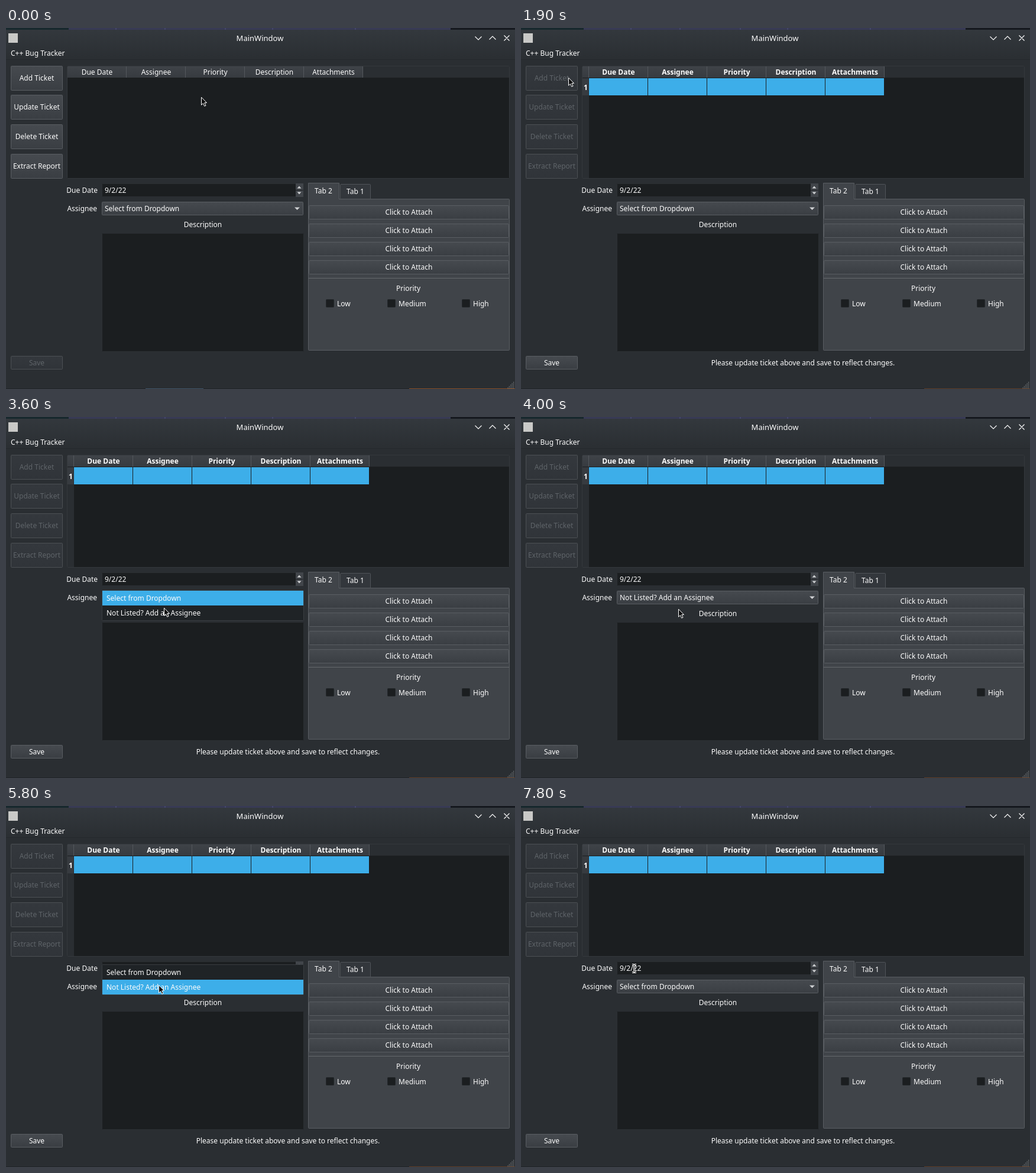
Recreate the animation shown at these times as an HTML page. Size 861x611 px, loop 8 s.

```html
<!DOCTYPE html>
<html lang="en">
<head>
<meta charset="utf-8">
<title>Bug tracker</title>
<style>
html, body { margin: 0; width: 100%; height: 100%; overflow: hidden; background: #2a2e32; }
svg { display: block; width: 861px; height: 611px; }
text { font: 12px "Noto Sans", sans-serif; fill: #fcfcfc; }
.title { font-size: 13px; }
.mid { text-anchor: middle; }
.end { text-anchor: end; }
.bold { font-weight: 700; }
.off { fill: #5f6469; }
.line { fill: none; stroke: #fcfcfc; stroke-width: 1.2; }

.anim, .anim * { animation: 8s step-end infinite; }
.anim.before { animation-name: before; }
.anim.after { animation-name: after; }
.anim.press { animation-name: press; }
.anim.glow { animation-name: glow; }
.anim.first { animation-name: first; }
.anim.second { animation-name: second; }
.anim.popup { animation-name: popup; }
.anim.popup .mark { animation-name: mark; }
.anim.cursor { animation-name: move; }
.anim.cursor .arrow { animation-name: arrow; }
.anim.cursor .beam { animation-name: beam; }
.anim.edge { animation-name: edge; }

@keyframes before { 0% { visibility: visible } 20%, 100% { visibility: hidden } }
@keyframes after { 0% { visibility: hidden } 20%, 100% { visibility: visible } }
@keyframes edge { 0% { visibility: visible } 18.75%, 100% { visibility: hidden } }
@keyframes press { 0% { visibility: hidden } 18.75% { visibility: visible } 20%, 100% { visibility: hidden } }
@keyframes glow { 0% { visibility: hidden } 26.25% { visibility: visible } 40%, 100% { visibility: hidden } }
@keyframes first { 0% { visibility: visible } 50% { visibility: hidden } 85%, 100% { visibility: visible } }
@keyframes second { 0% { visibility: hidden } 50% { visibility: visible } 85%, 100% { visibility: hidden } }
@keyframes popup {
  0% { visibility: hidden; transform: translate(163px, 294px) }
  40% { visibility: visible; transform: translate(163px, 294px) }
  50% { visibility: hidden; transform: translate(163px, 294px) }
  68.75% { visibility: visible; transform: translate(163px, 269px) }
  85%, 100% { visibility: hidden; transform: translate(163px, 269px) }
}
@keyframes mark {
  0% { transform: none }
  46.25% { transform: translateY(25px) }
  75%, 100% { transform: none }
}
@keyframes arrow {
  0% { visibility: visible }
  32.5% { visibility: hidden } 33.75% { visibility: visible }
  58.75% { visibility: hidden } 66.25% { visibility: visible }
  85%, 100% { visibility: hidden }
}
@keyframes beam {
  0% { visibility: hidden }
  32.5% { visibility: visible } 33.75% { visibility: hidden }
  58.75% { visibility: visible } 66.25% { visibility: hidden }
  85%, 100% { visibility: visible }
}
@keyframes move {
  0% { transform: translate(330px, 117px) }
  3.75% { transform: translate(225px, 108px) }
  5% { transform: translate(92px, 94px) }
  6.25% { transform: translate(28px, 84px) }
  7.5% { transform: translate(59px, 77px) }
  21.25% { transform: translate(62px, 78px) }
  22.5% { transform: translate(69px, 80px) }
  23.75% { transform: translate(80px, 84px) }
  25% { transform: translate(98px, 90px) }
  26.25% { transform: translate(121px, 97px) }
  27.5% { transform: translate(147px, 108px) }
  28.75% { transform: translate(170px, 131px) }
  30% { transform: translate(192px, 168px) }
  31.25% { transform: translate(217px, 218px) }
  32.5% { transform: translate(245px, 272px) }
  33.75% { transform: translate(265px, 302px) }
  35% { transform: translate(273px, 312px) }
  37.5% { transform: translate(273px, 311px) }
  43.75% { transform: translate(271px, 316px) }
  45% { transform: translate(267px, 323px) }
  46.25% { transform: translate(266px, 325px) }
  51.25% { transform: translate(265px, 322px) }
  52.5% { transform: translate(264px, 318px) }
  53.75% { transform: translate(262px, 315px) }
  57.5% { transform: translate(253px, 300px) }
  58.75% { transform: translate(241px, 281px) }
  60% { transform: translate(232px, 274px) }
  61.25% { transform: translate(210px, 270px) }
  62.5% { transform: translate(186px, 269px) }
  63.75% { transform: translate(199px, 273px) }
  65% { transform: translate(228px, 281px) }
  66.25% { transform: translate(247px, 296px) }
  67.5% { transform: translate(256px, 305px) }
  72.5% { transform: translate(258px, 303px) }
  73.75% { transform: translate(259px, 298px) }
  75% { transform: translate(260px, 288px) }
  76.25% { transform: translate(261px, 281px) }
  78.75% { transform: translate(261px, 276px) }
  80% { transform: translate(256px, 276px) }
  86.25% { transform: translate(252px, 276px) }
  87.5% { transform: translate(243px, 277px) }
  88.75% { transform: translate(231px, 278px) }
  90% { transform: translate(220px, 279px) }
  91.25% { transform: translate(211px, 280px) }
  93.75% { transform: translate(204px, 281px) }
  95% { transform: translate(200px, 279px) }
  96.25% { transform: translate(195px, 276px) }
  97.5%, 100% { transform: translate(191px, 275px) }
}
</style>
</head>
<body>
<script>
const rect = (x, y, w, h, fill, more = '') =>
  `<rect x="${x}" y="${y}" width="${w}" height="${h}" fill="${fill}" ${more}/>`;
const box = (x, y, w, h, fill, stroke) =>
  rect(x + .5, y + .5, w - 1, h - 1, fill, `stroke="${stroke}" rx="1"`);
const text = (x, y, label, cls = '') => `<text x="${x}" y="${y}" class="${cls}">${label}</text>`;
const path = (d, more) => `<path d="${d}" ${more}/>`;
const group = (cls, ...parts) => `<g class="${cls}">${parts.join('')}</g>`;
const fade = (id, a, b) => `<linearGradient id="${id}" x2="0" y2="1">
  <stop stop-color="${a}"/><stop offset="1" stop-color="${b}"/></linearGradient>`;

const button = (x, y, w, h, label, off) =>
  box(x, y, w, h, off ? 'url(#dim)' : 'url(#raised)', off ? '#4c5054' : '#595d62') +
  text(x + w / 2, y + Math.ceil(h / 2) + 4, label, off ? 'mid off' : 'mid');

const actions = ['Add Ticket', 'Update Ticket', 'Delete Ticket', 'Extract Report'];
const sideButtons = off => actions.map((s, i) =>
  button(8, Math.floor(64 + i * 49.67), 88, 42, s, off)).join('');

const columns = ['Due Date', 'Assignee', 'Priority', 'Description', 'Attachments'];
const header = (x, cls) => columns.map((s, i) => {
  const left = x + i * 100;
  return rect(left, 65, 99, 19, 'url(#head)') + rect(left + 99, 65, 1, 19, '#54585d') +
    text(left + 50, 79, s, cls);
}).join('');

const desktop = rect(0, 0, 861, 3, '#383a55') + rect(0, 0, 106, 3, '#17282d') +
  rect(752, 0, 109, 3, '#16191f') +
  [185, 268, 370, 450, 590].map(x => rect(x, 0, 2, 3, '#44466a')).join('') +
  rect(0, 610, 861, 1, '#202327') + rect(682, 610, 179, 1, '#5f3d27') +
  group('anim edge', rect(236, 610, 98, 1, '#40566a'), rect(682, 610, 179, 1, '#8a4f27'));

const titleBar = rect(0, 3, 861, 51, 'url(#title)') + rect(0, 53, 861, 1, '#25282c') +
  rect(4, 9, 16, 16, '#c9c9c7') + text(429.5, 22, 'MainWindow', 'mid title') +
  path('M793.5 14.5l5.5 5.5 5.5-5.5M817.5 19.5l5.5-5.5 5.5 5.5M842.5 12.5l9 9m0-9l-9 9', 'class="line"') +
  text(8, 47, 'C++ Bug Tracker');

const table = box(103, 64, 749, 191, '#1b1e20', '#34383c') + rect(104, 65, 747, 19, '#2a2e32');

const rowHeader = rect(104, 65, 10, 19, 'url(#head)') + rect(114, 65, 1, 19, '#54585d') +
  rect(104, 85, 11, 169, '#2a2e32') + rect(104, 85, 10, 29, '#373b40') +
  text(109.5, 105, '1', 'mid bold');

const cells = columns.map((s, i) => rect(115 + i * 100, 85, 99, 29, '#3daee9')).join('');

const form = text(155, 279, 'Due Date', 'end') + text(154, 310, 'Assignee', 'end') +
  box(162, 263, 341, 23, '#1b1e20', '#2b2f33') +
  rect(490, 263, 13, 11, '#41454a') + rect(490, 275, 13, 11, '#41454a') +
  path('M492.5 271.5h7l-3.5-4zM492.5 277.5h7l-3.5 4z', 'fill="#d0d2d4"') +
  text(167, 279, '9/2/22') +
  box(162, 294, 341, 23, 'url(#raised)', '#595d62') +
  path('M488 303.5h9l-4.5 4.5z', 'fill="#d0d2d4"') +
  group('anim first', text(167, 310, 'Select from Dropdown')) +
  group('anim second', text(167, 310, 'Not Listed? Add an Assignee')) +
  text(333, 337, 'Description', 'mid') +
  box(162, 347, 342, 201, '#1b1e20', '#2b2f33');

const tabs = box(565, 264, 52, 26, '#33373c', '#505459') +
  box(511, 289, 341, 257, '#404449', '#595d62') +
  path('M511.5 291V262.5h52V290', 'fill="#404449" stroke="#595d62"') +
  text(537, 280, 'Tab 2', 'mid') + text(591, 281, 'Tab 1', 'mid') +
  [0, 1, 2, 3].map(i => button(512, 300 + i * 31, 339, 24, 'Click to Attach')).join('') +
  rect(512, 423, 339, 1, '#66696d') + text(680.5, 445, 'Priority', 'mid') +
  [[541, 'Low'], [645, 'Medium'], [771, 'High']].map(([x, s]) =>
    box(x, 459, 14, 14, '#1b1e20', '#24282b') + text(x + 19, 471, s)).join('');

const popup = group('anim popup',
  box(-1, -1, 342, 52, '#1f2326', '#393d41'),
  `<rect class="mark" width="340" height="25" fill="#3daee9"/>`,
  text(7, 17, 'Select from Dropdown'), text(7, 42, 'Not Listed? Add an Assignee'));

const beamShape = 'M-3-6.5h2L.5-5 2-6.5h2M.5-5V5M-3 6.5h2L.5 5 2 6.5h2';
const cursor = group('anim cursor',
  path('M.5.2V13.3l3-2.8 2.2 4.8 2.3-1-2.2-4.7H9.6Z', 'class="arrow" fill="#0c0d0e" stroke="#fff"'),
  group('beam',
    path(beamShape, 'fill="none" stroke="#fff" stroke-width="3"'),
    path(beamShape, 'fill="none" stroke="#0c0d0e"')));

let grip = '';
for (let r = 0; r < 5; r++)
  for (let c = 0; c <= r; c++) grip += rect(858 - c * 2.4, 599 + r * 2.4, 1.2, 1.2, '#85898c');

document.body.innerHTML = `<svg viewBox="0 0 861 611"><defs>
  ${fade('raised', '#464a4f', '#3a3e43')}${fade('dim', '#34383d', '#303439')}
  ${fade('pressed', '#383c41', '#33373b')}${fade('head', '#3f4348', '#373b40')}
  ${fade('title', '#33383d', '#2a2e32')}${fade('lit', '#5bb6e9', '#40aee8')}</defs>` +
  rect(0, 0, 861, 611, '#2a2e32') + titleBar + desktop + table +
  group('anim before', sideButtons(false), header(104, 'mid'), button(8, 555, 88, 23, 'Save', true)) +
  group('anim press', box(8, 64, 88, 42, 'url(#pressed)', '#595d62'), text(52, 89, actions[0], 'mid')) +
  group('anim after', sideButtons(true), rowHeader, header(115, 'mid bold'), cells,
    button(8, 555, 88, 23, 'Save'),
    text(477, 571, 'Please update ticket above and save to reflect changes.', 'mid')) +
  group('anim glow', rect(115, 85, 99, 29, 'url(#lit)')) +
  form + tabs + grip + popup + cursor + '</svg>';
</script>
</body>
</html>
```
